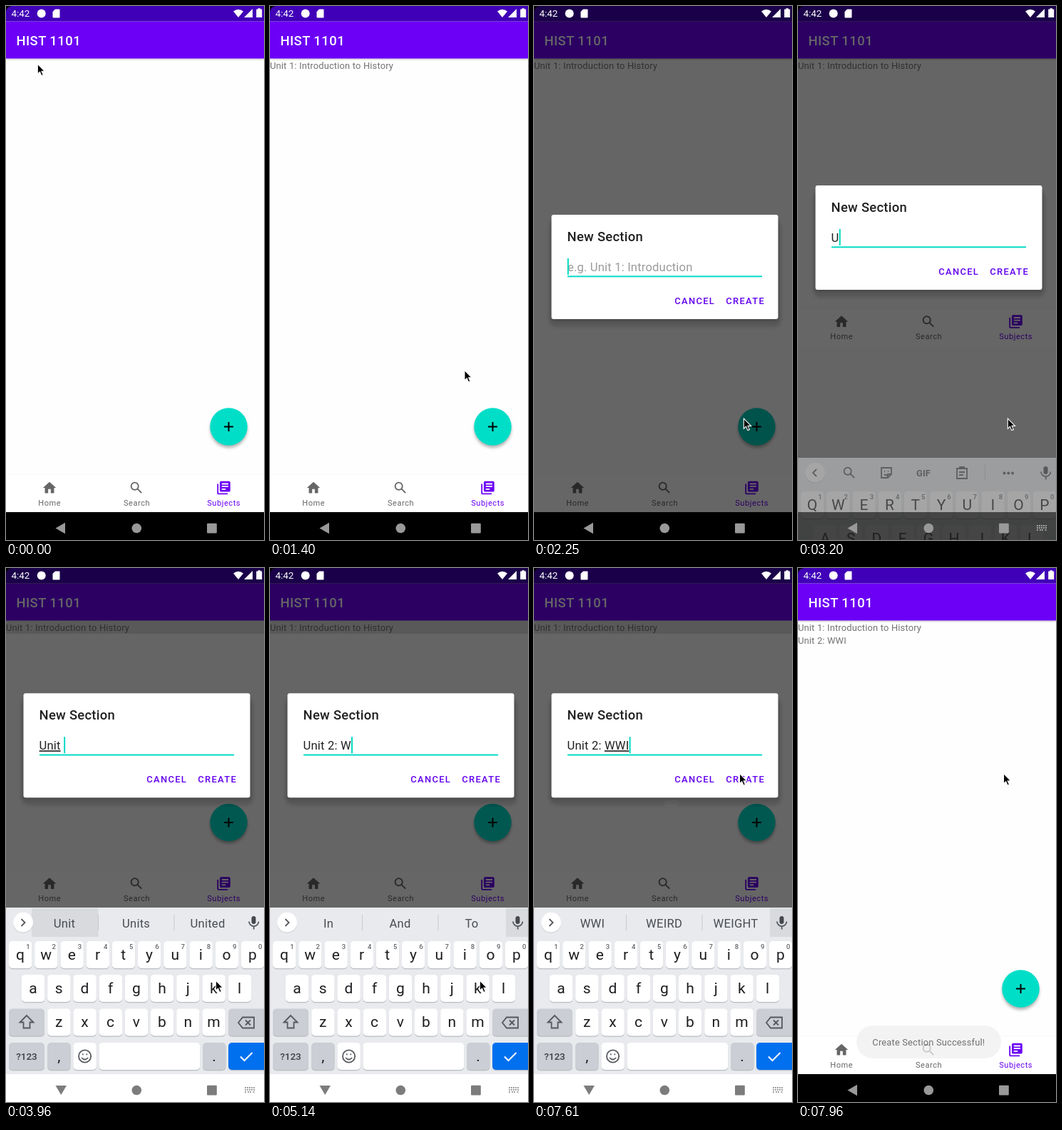
Write an HTML page that moves like this. It is 362 by 747 pixels and loops after 8000 ms.

```html
<!DOCTYPE html>
<html lang="en">
<head>
<meta charset="utf-8">
<title>New section</title>
<style>
  html, body { margin: 0; width: 100%; height: 100%; overflow: hidden; background: #fff; }
  svg { display: block; width: 362px; height: 747px; font-family: Roboto, sans-serif; }
  text { white-space: pre; }
  .title { font-size: 18.44px; font-weight: 500; letter-spacing: .25px; }
  .body { font-size: 12.9px; letter-spacing: .17px; fill: #737373; }
  .label { font-size: 11.06px; letter-spacing: .55px; text-anchor: middle; }
  .input { font-size: 16.6px; letter-spacing: .17px; }
  .button { font-size: 12.9px; font-weight: 500; letter-spacing: 1.35px; fill: #6200ee; }
  .mid { text-anchor: middle; }
  .key { font-size: 21px; text-anchor: middle; fill: #1d1e20; }
  .caps .key { text-transform: uppercase; }
  .num { font-size: 9.5px; font-weight: 500; text-anchor: middle; fill: #63666b; }
  .word { font-size: 16.6px; letter-spacing: .25px; text-anchor: middle; fill: #494c51; }
  .line { fill: none; stroke: #55585d; stroke-width: 1.8; }
</style>
</head>
<body>
<svg id="stage" viewBox="0 0 362 747"></svg>
<script>
const LOOP = 8000, KEYBOARD_SHIFT = -232.5;
const INPUT_FONT = '16.6px Roboto, sans-serif', INPUT_SPACING = .17;

// ---------- drawing ----------
const rect = (x, y, w, h, fill, rx = 0, more = '') =>
  `<rect x="${x}" y="${y}" width="${w}" height="${h}" rx="${rx}" fill="${fill}" ${more}/>`;
const text = (x, y, cls, content, more = '') =>
  `<text x="${x}" y="${y}" class="${cls}" ${more}>${content}</text>`;
const path = (d, more = '') => `<path d="${d}" ${more}/>`;
const group = (id, content, more = '') => `<g id="${id}" ${more}>${content}</g>`;
const icon = (cx, cy, content, more = '') =>
  `<g transform="translate(${cx} ${cy}) scale(.922) translate(-12 -12)" ${more}>${content}</g>`;

const magnifier = color =>
  `<g fill="none" stroke="${color}" stroke-width="2"><circle cx="9.5" cy="9.5" r="5.5"/><path d="M13.8 13.8l6 6"/></g>`;
const HOME = path('M10 20v-6h4v6h5v-8h3L12 3 2 12h3v8z');
const BOOKS = path('M4 6H2v14c0 1.1.9 2 2 2h14v-2H4zM20 2H8c-1.1 0-2 .9-2 2v12c0 1.1.9 2 2 2h12c1.1 0 2-.9 2-2V4c0-1.1-.9-2-2-2zm-1 9H9V9h10zm-4 4H9v-2h6zm4-8H9V5h10z', 'fill-rule="evenodd"');

function bottomNav() {
  return rect(0, 655, 362, 54, '#fff') + rect(0, 654.5, 362, .8, '#000', 0, 'opacity=".035"') +
    icon(61, 674, HOME, 'fill="#666"') + text(61.2, 698.5, 'label', 'Home', 'fill="#666"') +
    icon(183, 674, magnifier('#666')) + text(183.6, 698.5, 'label', 'Search', 'fill="#666"') +
    icon(305.5, 674, BOOKS, 'fill="#6a00f4"') + text(305.7, 698.5, 'label', 'Subjects', 'fill="#6a00f4"');
}

function fab() {
  return `<circle cx="312.5" cy="592" r="26" opacity=".3" filter="url(#soft)"/>
    <circle cx="312.5" cy="588.5" r="26.3" fill="#00dec8"/>
    <circle id="ripple" cx="312.5" cy="588.5" r="26.3"/>` +
    path('M306 588.5h13M312.5 582v13', 'stroke="#000" stroke-width="2"');
}

function statusIcons() {
  return text(7.5, 15.3, '', '4:42', 'font-size="13.4" fill="#fff"') +
    `<g fill="#fff"><circle cx="49.7" cy="10.5" r="6"/>` +
    path('M69 4.5h5.5q1 0 1 1v10q0 1-1 1h-8q-1 0-1-1V8z') +
    path('M319 7.5Q326 2 333 7.5L326 16z') + path('M346 4v12h-12z') +
    path('M353.5 4.5V3.3h3.4v1.2h2.3V16h-8V4.5z') + '</g>' +
    path('M0 0h8Q1 1 0 8z');
}

function dialog() {
  return rect(21, 8, 326, 149, '#000', 10, 'opacity=".13" filter="url(#soft)"') +
    rect(24.5, 3, 318, 145, '#000', 4, 'opacity=".2" filter="url(#soft)"') +
    rect(24.5, 0, 318, 146, '#fff', 3) +
    text(46.6, 37, 'title', 'New Section', 'fill="#212121"') +
    text(47, 79, 'input', 'e.g. Unit 1: Introduction', 'id="hint" fill="#9b9b9b"') +
    `<text x="46.6" y="79" class="input" fill="#212121"><tspan id="before"></tspan><tspan id="composing" text-decoration="underline"></tspan><tspan id="after"></tspan></text>` +
    rect(47, 85.3, 273, 2, '#03dac5') + rect(47, 61, 2, 23, '#03dac5', 0, 'id="caret"') +
    text(197.2, 125, 'button', 'CANCEL') + text(269.3, 125, 'button', 'CREATE');
}

function keyCap(x, y, w, fill = '#fff') {
  return rect(x, y + 1.2, w, 38, '#b9bcc2', 5) + rect(x, y, w, 38, fill, 5);
}

function keyRow(letters, left, y, numbered) {
  return [...letters].map((letter, i) => {
    const x = left + i * 36.2;
    return keyCap(x, y, 32.4) + text(x + 16, y + 25.5, 'key', letter) +
      (numbered ? text(x + 27, y + 10.5, 'num', (i + 1) % 10) : '');
  }).join('');
}

function keyboard() {
  const dark = '#cbced4';
  const words = [82, 182.6, 283].map(x => text(x, 502.5, 'word', '')).join('');
  const bars = path('M129.5 485v22M236 485v22', 'stroke="#c6c8cd"');
  const tools = icon(72, 496, magnifier('#55585d')) +
    path('M117 489h14v9l-5 5h-9zM126 503v-5h5M121 494h1M126 494h1M121 498q3 3 5 0', 'class="line"') +
    text(176, 501, 'mid', 'GIF', 'font-size="13" font-weight="700" fill="#55585d"') +
    path('M223 490h14v14h-14zM227 490v-2h6v2M226 495h8M226 499h6', 'class="line"') +
    path('M262.5 485v22', 'stroke="#c6c8cd"') +
    [289.5, 295.3, 301].map(x => `<circle cx="${x}" cy="496.5" r="2" fill="#55585d"/>`).join('');
  return rect(0, 475, 362, 272, '#e8eaed') +
    rect(36, 476, 93.5, 40, '#d8dade', 0, 'id="wordGlow"') +
    rect(331, 476, 31, 40, '#d8dade', 0, 'id="micGlow"') +
    '<circle cx="24" cy="496.5" r="14" fill="#b9bcc2"/><circle cx="24" cy="495.8" r="14" fill="#fff"/>' +
    path('', 'id="chevron" class="line"') +
    group('words', words + bars) + group('tools', tools) +
    rect(344.5, 487, 6, 11, '#45484d', 3) + path('M341 494.5a6.7 6.7 0 0 0 13.4 0M347.7 501v4.5', 'class="line"') +
    keyRow('qwertyuiop', 4, 522, true) + keyRow('asdfghjkl', 22, 569) + keyRow('zxcvbnm', 58.2, 616.5) +
    keyCap(4, 616.5, 50, dark) + path('M29 626l-9.5 9.5h5v8h9v-8h5z', 'class="line"') +
    keyCap(312, 616.5, 55, dark) + path('M326 636l6-7.5h16v15h-16zM336 632.5l7 7M343 632.5l-7 7', 'class="line"') +
    keyCap(4, 664, 50, dark) + text(29, 688, 'mid', '?123', 'font-size="13.5" font-weight="500" fill="#3c3f44"') +
    keyCap(58.2, 664, 32.4, dark) + text(74.4, 690, 'key', ',') +
    keyCap(94.4, 664, 32.4) + '<circle cx="110.6" cy="683" r="8.6" class="line"/>' +
    path('M107 680.3h1.8M112.4 680.3h1.8M106 685q4.6 5 9.2 0', 'class="line"') +
    keyCap(130.6, 664, 141.5) + keyCap(276, 664, 32.4, dark) + text(292, 690, 'key', '.') +
    keyCap(312, 664, 55, '#0070ee') + path('M329 683.5l5.5 5.5 11-11', 'fill="none" stroke="#fff" stroke-width="2"');
}

function systemBar() {
  return rect(0, 708, 362, 39, '#000', 0, 'id="barFill"') +
    group('barIcons', path('', 'id="back"') + '<circle cx="183.3" cy="730.5" r="6.8"/>' +
      '<rect x="282" y="723.8" width="13.8" height="13.8" rx="1"/>') +
    path('M335 727h14M335 730h14M335 733h2.5M339 733h6M346.5 733h2.5',
      'id="switcher" stroke="#a0a0a0" stroke-width="1.8" stroke-dasharray="2 1"');
}

document.getElementById('stage').innerHTML =
  '<defs><filter id="soft" x="-20%" y="-20%" width="140%" height="150%"><feGaussianBlur stdDeviation="2"/></filter></defs>' +
  rect(0, 0, 362, 747, '#fefefe') +
  rect(0, 72, 362, 2.5, '#000', 0, 'opacity=".3" filter="url(#soft)"') +
  rect(0, 21.5, 362, 52, '#6c00f6') + rect(0, 0, 362, 21.5, '#4000b8') +
  text(14.4, 55, 'title', 'HIST 1101', 'fill="#fff" style="letter-spacing:.45px"') +
  rect(0, 74, 362, 18, '#dfdfdf', 0, 'id="rowGlow"') +
  text(0, 88, 'body', 'Unit 1: Introduction to History', 'id="unit1"') +
  text(0, 106, 'body', 'Unit 2: WWI', 'id="unit2"') +
  group('nav', bottomNav()) + group('fab', fab()) +
  rect(0, 0, 362, 747, '#000', 0, 'id="dim"') +
  rect(182, 324, 21, 10, '#777', 5, 'id="glint"') +
  group('dialog', dialog()) + group('keys', keyboard()) + systemBar() + statusIcons() +
  group('toast', rect(82, 640, 203, 46, '#efefef', 23) +
    text(183.3, 668, 'body mid', 'Create Section Successful!', 'style="fill:#3a3a3a"')) +
  group('pointer', path('M0 0V14.2L3.2 11.2 5.6 16.6 8 15.6 5.7 10.4H10.2Z', 'stroke="#fff" stroke-width="1.1"'));

const el = Object.fromEntries([...document.querySelectorAll('#stage [id]')].map(node => [node.id, node]));
const wordNodes = [...el.words.querySelectorAll('text')];
const ruler = document.createElement('canvas').getContext('2d');
ruler.font = INPUT_FONT;
const inputWidth = s => ruler.measureText(s).width + s.length * INPUT_SPACING;

// ---------- timeline: each entry holds until the next ----------
const smooth = p => p * p * (3 - 2 * p);
function glide(start, end, count, from, to) {
  return Array.from({ length: count }, (_, i) => {
    const p = smooth((i + 1) / count);
    return [start + i * (end - start) / (count - 1), from.map((v, k) => v + (to[k] - v) * p)];
  });
}

const track = {
  pointer: [[0, [44.3, 81]],
    ...glide(770, 1000, 5, [44.3, 81], [269, 497]),
    ...glide(1290, 1680, 8, [269, 497], [294.3, 577]),
    ...glide(5870, 6090, 4, [294.3, 577], [291, 350]),
    ...glide(6670, 7370, 13, [291, 350], [288.5, 287.5])],
  unit1: [[0, 0], [230, .5], [290, 1]],
  unit2: [[0, 0], [7820, 1]],
  rowGlow: [[0, 0], [3370, 1], [7820, 0]],
  ripple: [[0, 0], [1850, .05], [1910, .1], [1960, .13], [2250, .06], [3140, 0]],
  fab: [[0, 1], [3200, 0], [3370, 1]],
  shift: [[0, 0], [3200, KEYBOARD_SHIFT], [7750, 0]],
  dim: [[0, 0], [2140, .2], [2200, .42], [2250, .6], [7680, .45], [7750, .25], [7820, .08], [7890, 0]],
  dialog: [[0, 0], [2140, .7], [2200, .95], [2250, 1], [7680, .5], [7750, 0]],
  dialogY: [[0, 292], [3200, 251], [3250, 217], [3310, 193], [3370, 180], [3420, 175.2]],
  keys: [[0, 0], [3200, .42], [3250, .7], [3310, .9], [3370, 1], [7750, .8], [7820, .4], [7890, 0]],
  keysY: [[0, 272], [3200, 157], [3250, 90], [3310, 45], [3370, 16], [3420, 4], [3480, 0],
    [7680, 25], [7750, 90], [7820, 180], [7890, 272]],
  // grey level and opacity of the system bar
  bar: [[0, [0, 1]], [3200, [0, .58]], [3250, [120, .8]], [3310, [255, 1]], [7820, [0, 1]]],
  caret: [[0, 1], [2670, 0], [3140, 1], [6380, 0], [6880, 1], [7370, 0], [7610, 1]],
  toast: [[0, 0], [7890, .35], [7960, .72]],
  glint: [[0, 0], [7610, .3], [7680, 0]],
  wordGlow: [[0, 0], [3720, 1], [4130, 0]],
  micGlow: [[0, 0], [4130, 1]],
  // committed text, underlined text, trailing text
  typed: [[0, ['', '']], [3140, ['U', '']], [3420, ['', 'Un']], [3720, ['', 'Uni']], [3900, ['', 'Unit']],
    [3960, ['', 'Unit', ' ']], [4130, ['Unit ', '']], [4420, ['Unit 2', '']], [4540, ['Unit 2:', '']],
    [4780, ['Unit 2: ', '']], [5140, ['Unit 2: W', '']], [5200, ['Unit 2: ', 'W']],
    [5560, ['Unit 2: ', 'WW']], [5800, ['Unit 2: ', 'WWI']]],
  // null shows the tool strip instead of suggestions
  words: [[0, null], [3310, ['Un', 'Unit', 'Until']], [3720, ['Unit', 'United', 'University']],
    [3900, ['Unit', 'Units', 'United']], [4190, ['In', 'And', 'To']], [4420, null],
    [4840, ['In', 'And', 'To']], [5200, ['W', 'We', 'Will']], [5560, ['WW', 'Who', 'WWII']],
    [6620, ['WWI', 'WEIRD', 'WEIGHT']]]
};

const at = (name, t) => track[name].findLast(([start]) => start <= t)[1];
const move = (node, x, y) => node.setAttribute('transform', `translate(${x} ${y})`);
const FADED = ['unit1', 'unit2', 'rowGlow', 'ripple', 'fab', 'dim', 'dialog', 'keys', 'caret', 'toast', 'glint', 'wordGlow', 'micGlow'];

function draw(t) {
  for (const name of FADED) el[name].setAttribute('opacity', at(name, t));
  move(el.pointer, ...at('pointer', t));
  move(el.nav, 0, at('shift', t));
  move(el.fab, 0, at('shift', t));
  move(el.dialog, 0, at('dialogY', t));
  move(el.keys, 0, at('keysY', t));

  const [before, composing, after = ''] = at('typed', t);
  const full = before + composing + after;
  el.before.textContent = before;
  el.composing.textContent = composing;
  el.after.textContent = after;
  el.hint.setAttribute('opacity', full ? 0 : 1);
  el.caret.setAttribute('x', 46.8 + inputWidth(full));

  const words = at('words', t);
  wordNodes.forEach((node, i) => { node.textContent = words ? words[i] : ''; });
  el.words.setAttribute('opacity', words ? 1 : 0);
  el.tools.setAttribute('opacity', words ? 0 : 1);
  el.chevron.setAttribute('d', words ? 'M21.5 491l5 5-5 5' : 'M26 491l-5 5 5 5');
  el.keys.classList.toggle('caps', t < 3310);

  const [shade, cover] = at('bar', t);
  const light = shade > 200;
  el.barFill.setAttribute('fill', `rgba(${shade},${shade},${shade},${cover})`);
  el.barIcons.setAttribute('fill', light ? '#7c7c7c' : '#999');
  el.back.setAttribute('d', light ? 'M69.5 724h15.5l-7.75 13z' : 'M69.5 730.5l13.5-7.7v15.4z');
  el.switcher.setAttribute('opacity', t >= 3200 && t < 7820 ? 1 : 0);
}

function tick() {
  draw(performance.now() % LOOP);
  requestAnimationFrame(tick);
}
tick();
</script>
</body>
</html>
```
